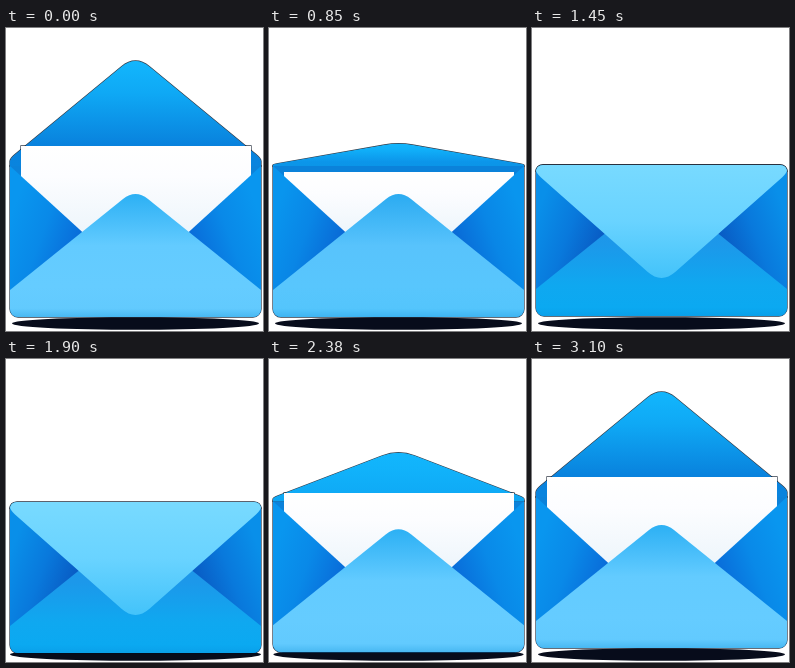
Recreate the animation shown at these times as an HTML page with a canvas. Size 257 by 303 pixels, loop 3430 ms.

```html
<!DOCTYPE html>
<html lang="en">
<head>
<meta charset="utf-8">
<title>Envelope</title>
<style>
  html, body { margin: 0; width: 100%; height: 100%; overflow: hidden; background: #fff; }
  canvas { display: block; width: 100%; height: 100%; }
</style>
</head>
<body>
<canvas id="stage" width="257" height="303"></canvas>
<script>
const ctx = document.getElementById('stage').getContext('2d');
const LOOP = 3430, START = 220, END = 3100, STEP = 30;
const L = 4, R = 255, MID = 129.5, HINGE = 138, BASE = 289;

// Smooth track through [time, value] pairs, flat at each turning point
function track(...keys) {
  const rise = keys.slice(1).map((k, i) => (k[1] - keys[i][1]) / (k[0] - keys[i][0]));
  const slope = keys.map((_, i) => {
    const a = rise[i - 1], b = rise[i];
    return a * b > 0 ? 2 * a * b / (a + b) : 0;
  });
  return t => {
    if (t <= keys[0][0]) return keys[0][1];
    const i = keys.findIndex(k => k[0] >= t) - 1;
    if (i < 0) return keys[keys.length - 1][1];
    const [t0, v0] = keys[i], [t1, v1] = keys[i + 1];
    const h = t1 - t0, u = (t - t0) / h, w = 1 - u;
    return v0 * (1 + 2 * u) * w * w + v1 * u * u * (3 - 2 * u)
      + h * u * w * (slope[i] * w - slope[i + 1] * u);
  };
}

const tipAt = track([220, 33], [420, 18], [520, 26], [730, 61], [1090, 240], [1210, 254],
  [1330, 251], [2170, 251], [2240, 246], [2350, 122], [2470, 19], [2620, 37],
  [2760, 31], [2900, 34], [3100, 33]);
const paperAt = track([220, 118], [430, 90], [520, 93], [860, 144], [2320, 144],
  [2490, 94], [2620, 107], [2760, 121], [2900, 117], [3100, 118]);
const dropAt = track([800, 0], [1090, 1], [1180, 9], [1270, 7], [1400, -2], [1450, -1],
  [1600, 0], [1810, 2], [2000, 9], [2170, 12], [2350, 6], [2470, -1], [2620, 0]);
const roundAt = track([220, 14], [2350, 14], [2480, 30], [2620, 30], [2800, 14]);
const shadeAt = track([220, 1], [520, .6], [730, .6], [2350, .2], [2620, .1], [3100, 1]);

const clamp = v => Math.max(0, Math.min(1, v));
const mix = (a, b, u) => `rgb(${a.map((v, i) => Math.round(v + (b[i] - v) * u))})`;

function gradient(x0, y0, x1, y1, ...stops) {
  const g = ctx.createLinearGradient(x0, y0, x1, y1);
  stops.forEach(([p, c]) => g.addColorStop(p, c));
  return g;
}

function polygon(...pts) {
  const p = new Path2D();
  pts.forEach(([x, y]) => p.lineTo(x, y));
  p.closePath();
  return p;
}

function fill(path, style) {
  ctx.fillStyle = style;
  ctx.fill(path);
}

function rim(path) {
  ctx.strokeStyle = 'rgba(0,12,28,.8)';
  ctx.lineWidth = 1.3;
  ctx.stroke(path);
}

// Rounded triangle hinged at the top of the body
function flapPath(tip, r) {
  const k = (tip - HINGE) / 113, dir = Math.sign(k) || 1;
  const side = HINGE + 8 * k, half = MID - L;
  const reach = (tip - side) / (1 - r / half / 2);
  const apex = side + reach, near = apex - reach * r / half;
  const p = new Path2D();
  const c = dir > 0 ? 7 : 0, soft = 5;
  const bend = side + reach * soft / half;
  p.moveTo(L + c, HINGE);
  p.quadraticCurveTo(L, HINGE, L, HINGE + Math.min(c, 8 * Math.abs(k)));
  p.lineTo(L, side - k * 3);
  p.quadraticCurveTo(L, side, L + soft, bend);
  p.lineTo(MID - r, near);
  p.quadraticCurveTo(MID, apex, MID + r, near);
  p.lineTo(R - soft, bend);
  p.quadraticCurveTo(R, side, R, side - k * 3);
  p.lineTo(R, HINGE + Math.min(c, 8 * Math.abs(k)));
  p.quadraticCurveTo(R, HINGE, R - c, HINGE);
  p.closePath();
  return p;
}

const sides = [
  polygon([L, HINGE], [78.5, 206], [L, 263]),
  polygon([R, HINGE], [180.5, 206], [R, 263])
];
const pocket = new Path2D();
pocket.moveTo(L, 262);
pocket.lineTo(117, 171);
pocket.quadraticCurveTo(MID, 161, 142, 171);
pocket.lineTo(R, 262);
pocket.lineTo(R, BASE);
pocket.lineTo(L, BASE);
pocket.closePath();

function drawShadow(drop) {
  ctx.beginPath();
  ctx.ellipse(MID, 295.5, 123.5 + Math.max(0, drop) * .4, 6.3, 0, 0, 2 * Math.PI);
  ctx.fillStyle = '#070c1b';
  ctx.fill();
}

function drawBody(body, closed) {
  ctx.save();
  ctx.clip(body);
  sides.forEach((s, i) => {
    const edge = i ? R : L, inner = i ? 180 : 79;
    fill(s, gradient(edge, 190, inner, 218,
      [0, mix([9, 150, 239], [9, 143, 233], closed)],
      [.45, mix([9, 137, 232], [9, 121, 220], closed)],
      [1, mix([9, 102, 214], [8, 82, 188], closed)]));
  });
  fill(pocket, gradient(0, 166, 0, BASE,
    [0, mix([44, 176, 244], [35, 143, 228], closed)],
    [.42, mix([99, 203, 255], [28, 152, 234], closed)],
    [.75, mix([101, 204, 255], [15, 168, 240], closed)],
    [.93, mix([98, 202, 254], [11, 169, 241], closed)],
    [1, mix([72, 184, 242], [9, 160, 234], closed)]));
  ctx.restore();
}

function draw(t) {
  const tip = tipAt(t), top = paperAt(t), drop = dropAt(t), shade = shadeAt(t);
  const shut = tip > HINGE;
  const closed = clamp((tip - 100) / 100);
  const flap = flapPath(tip, roundAt(t));
  const corner = shut ? 7 : 0;
  const body = new Path2D();
  body.roundRect(L, HINGE, R - L, BASE - HINGE, [corner, corner, 8, 8]);
  const paper = new Path2D();
  paper.rect(15, top, 230, 262 - top);

  ctx.clearRect(0, 0, 257, 303);
  ctx.fillStyle = '#fff';
  ctx.fillRect(0, 0, 257, 303);
  drawShadow(drop);

  ctx.save();
  ctx.translate(0, drop);
  [paper, flap, body].forEach(rim);
  fill(body, '#0b82da');
  if (!shut) {
    fill(flap, gradient(0, tip, 0, HINGE,
      [0, '#12b6fd'],
      [.3, mix([17, 181, 252], [15, 169, 245], shade)],
      [.8, mix([16, 180, 252], [9, 130, 221], shade)],
      [1, mix([14, 174, 248], [9, 132, 222], shade)]));
  }
  fill(paper, gradient(0, top, 0, 206, [0, '#fff'], [.35, '#fcfdff'], [1, '#edf5fb']));
  drawBody(body, closed);
  if (shut) {
    fill(flap, gradient(0, HINGE, 0, tip, [0, '#78daff'], [.5, '#69d3ff'], [1, '#43c3fa']));
  }
  ctx.restore();
}

function frame(now) {
  const t = now % LOOP;
  const held = t < START ? 0 : Math.min(END, START + Math.floor((t - START) / STEP) * STEP);
  draw(held);
  requestAnimationFrame(frame);
}
draw(0);
requestAnimationFrame(frame);
</script>
</body>
</html>
```
